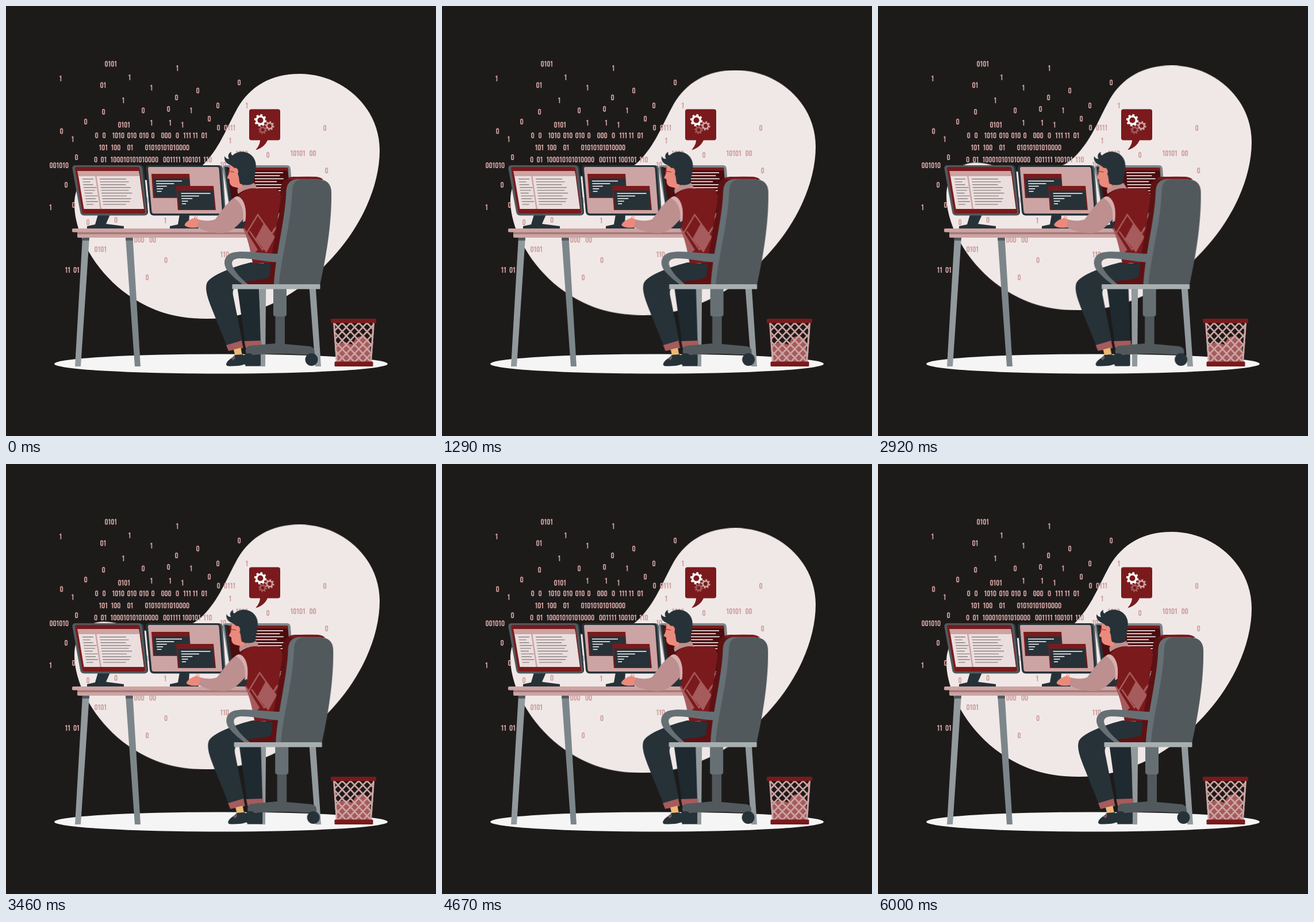
An HTML page that plays this animation: 748x748 px, repeating every 6.04 s.

```html
<!DOCTYPE html>
<html lang="en">
<head>
<meta charset="utf-8">
<title>Programmer at work</title>
<style>
  html, body { margin: 0; width: 100%; height: 100%; overflow: hidden; background: #1d1b1a; }
  svg { display: block; width: 100%; height: 100%; }
  :root { --red: #7a1a1c; --deep: #5e1113; --pink: #cca4a3; --rose: #a65b5c; --ink: #263238; --steel: #667074; --slate: #52595d; --skin: #eb8a7c; }
  .red { fill: var(--red); } .deep { fill: var(--deep); } .pink { fill: var(--pink); }
  .rose { fill: var(--rose); } .ink { fill: var(--ink); } .steel { fill: var(--steel); }
  .slate { fill: var(--slate); } .skin { fill: var(--skin); } .leg { fill: #92999d; }
  .line { fill: none; stroke: #fff; stroke-width: 1.5; }
  .gear circle { fill: none; }

  /* 6 s of motion followed by a 40 ms rest */
  #blob { animation: float 6040ms linear infinite; }
  #worker { animation: shake 6040ms linear infinite; }
  @keyframes float {
    0%, 99.34%, 100% { transform: translateY(0); }
    49.67% { transform: translateY(-15px); }
  }
  @keyframes shake {
    0%, 99.34%, 100% { transform: translateX(0); }
    9.93%, 89.4% { transform: translateX(-1.5px); }
    19.87%, 79.47% { transform: translateX(3px); }
    29.8%, 49.67%, 69.54% { transform: translateX(-6px); }
    39.74%, 59.6% { transform: translateX(6px); }
  }
</style>
</head>
<body>
<svg viewBox="0 0 748 748">
  <defs>
    <clipPath id="basket"><path d="M569 551H641L636 620H574Z"/></clipPath>
    <clipPath id="vestClip"><path d="M404 330C414 319 425 316 438 317L471 318 478 332 460 450 429 447C425 422 420 402 413 388L417 374Z"/></clipPath>
  </defs>

  <path id="blob" fill="#f0e8e7" d="M511 118C585 118 650 176 650 251C650 318 613 393 557 449C505 505 430 544 349 544C290 544 252 528 222 509C160 470 119 400 119 345C119 310 140 287 170 287C200 287 220 303 250 303C290 303 318 300 342 277C372 247 384 211 403 177C425 140 460 118 511 118Z"/>
  <ellipse cx="374" cy="622.5" rx="290" ry="17" fill="#f5f5f5"/>
  <path id="bits" fill="none" stroke="#cda09f" stroke-width="1.7"/>

  <!-- speech bubble -->
  <path class="red" d="M427 179.5H473Q477 179.5 477 183.500V229.500Q477 233.500 473 233.500H455C451 242 444 248 434 250.500C439 245 442 239 442 233.500H427Q423 233.500 423 229.500V183.500Q423 179.500 427 179.500Z"/>
  <g class="gear" stroke="#cca4a3">
    <circle cx="458.500" cy="208.500" r="4.800" stroke-width="2.800"/>
    <circle cx="458.500" cy="208.500" r="7" stroke-width="2.400" pathLength="16" stroke-dasharray="1"/>
  </g>
  <g class="gear" stroke="#a65b5c">
    <circle cx="446.500" cy="215.500" r="4.300" stroke-width="2.600"/>
    <circle cx="446.500" cy="215.500" r="6.200" stroke-width="2.200" pathLength="16" stroke-dasharray="1"/>
  </g>
  <g class="gear" stroke="#fff">
    <circle cx="442.500" cy="198.800" r="6.800" stroke-width="3.500"/>
    <circle cx="442.500" cy="198.800" r="9.200" stroke-width="3" pathLength="16" stroke-dasharray="1"/>
  </g>

  <!-- right monitor -->
  <path fill="#7f878b" d="M384 277H489Q494 277 495 283L501 364H391L377 283Q376 277 384 277Z"/>
  <path class="ink" d="M380 280H386L398 362H391Z"/>
  <path fill="#4b0d0f" d="M384 281H490L497 360H396Z"/>
  <path class="red" d="M388 281H490L491 286H389Z"/>
  <path class="line" id="code3"/>
  <path class="ink" d="M390 387V383L404 380 400 362H420V387Z"/>

  <!-- left monitor -->
  <path class="ink" d="M160 363H181L174 379 205 383V387H141V383L155 380Z"/>
  <path class="ink" d="M228 277H234Q239 277 240 283L247 358Q247 364 241 364H232Z"/>
  <path class="slate" d="M121 277H231Q236 277 237 283L245 358Q246 364.500 240 364.500H136Q130 364.500 129 358L115.500 283Q115 277 121 277Z"/>
  <path class="red" d="M123 280H229Q232 280 232.500 283L242 358Q242 361 239 361H136Q133 361 132.500 358L120 283Q120 280 123 280Z"/>
  <path class="pink" d="M124 287H231L233 297H126Z"/>
  <path fill="#eadfde" d="M126 296H232.500L240 353H135.500Z"/>
  <path class="pink" d="M155 296H157.500L166 353H163.500Z"/>
  <g fill="none" stroke="#8f8484" stroke-width="1.400">
    <path id="code1a"/><path id="code1b"/>
  </g>

  <!-- middle monitor -->
  <path class="ink" d="M302 363H319L318 379 335 383V387H285V383L299 380Z"/>
  <path class="slate" d="M365 277H371Q376 277 377 283L382 358Q382 364 376 364H368Z"/>
  <path class="ink" d="M248 277H368Q373 277 374 283L380 358Q380 364.500 374 364.500H257Q251 364.500 250 358L243 283Q242.500 277 248 277Z"/>
  <path class="pink" d="M249 280H367Q370 280 370.500 283L376 358Q376 361 373 361H257Q254 361 253.500 358L247 283Q247 280 249 280Z"/>
  <path class="red" d="M253 292H319L322 334H256Z"/>
  <path class="ink" d="M256 300H318.500L320.500 332H258.500Z"/>
  <path class="line" id="code2a"/>
  <path class="red" d="M296 313H361L365 355H299Z"/>
  <path class="ink" d="M299 321H360.500L363 353.500H301Z"/>
  <path class="line" id="code2b"/>

  <!-- desk -->
  <path class="leg" d="M133 402H145L130 627H120Z"/>
  <path fill="#7c868a" d="M208 402H220.500L234 627H224Z"/>
  <path class="slate" d="M133 402H145L144.600 408H132.600ZM208 402H220.500L220.900 408H208.400Z"/>
  <path class="leg" d="M440 403H453L451 627H442Z"/>
  <path class="leg" d="M521 403H533L548 627H538Z"/>
  <path class="pink" d="M124 393H540V403H126Q124 403 124 401Z"/>
  <path fill="#a87878" d="M124 393H540V397H124Z"/>
  <rect class="pink" x="115" y="387" width="425" height="6.500" rx="2"/>

  <!-- waste basket -->
  <path class="rose" d="M574 620L575 590 588 584 602 589 609 577 622 573 632 582 636 620Z"/>
  <g clip-path="url(#basket)" fill="none" stroke="#cca4a3">
    <path id="mesh" stroke-width="2.700"/>
    <path d="M569 551L574 620M641 551L636 620" stroke-width="6"/>
  </g>
  <rect class="red" x="565" y="544" width="79" height="7.500" rx="1.500"/>
  <rect class="red" x="571.500" y="618.500" width="67" height="8.500" rx="1.500"/>

  <g id="worker">
    <!-- far leg -->
    <path fill="#1f2a30" d="M402 486H440L443 585 416 586Z"/>
    <path class="ink" d="M424 608C430 606 437 606 443 604V624Q443 626.500 440 626.500H416Z"/>
    <path class="rose" d="M414.500 583L444 582 445 592 417 595Z"/>

    <!-- cushions -->
    <path class="deep" d="M477 484L548 300C543 297 532 297 500 297Q479 299 478 318L476 360 440 474C425 474 403 473 399 484Z"/>
    <path class="red" d="M492 298Q515 296 540 297 548 298 552 302H490Z"/>

    <!-- near leg -->
    <path class="ink" d="M461 449L426 446C400 452 354 468 349 483C346 494 351 508 357 524L384 591 411 583 395 503C394 495 395 492 402 486C416 474 445 480 458 471Z"/>
    <path class="rose" d="M383 590L410 582 412.500 595 387 600Z"/>
    <path fill="#edb875" d="M396 597.500L408.500 594.500 411 608 399 610Z"/>
    <path class="ink" d="M383 623C385 615 394 613 398 607L411 606 419 610V621C411 626 402 626.500 388 626.500Q383 626.500 383 623Z"/>
    <path d="M394 611Q399 607 397 614M392 614Q397 610 395 616" fill="none" stroke="#c98f8e" stroke-width="1"/>

    <!-- torso -->
    <path class="red" d="M404 330C414 319 425 316 438 317L471 318C478 322 479 332 476 350L460 447 429 447C425 422 420 402 413 388L417 374Z"/>
    <g clip-path="url(#vestClip)">
      <path class="rose" d="M449 377L468 402 453 429 434 405ZM414 385L438 424 428 434 412 405ZM478 382L466 410 478 425Z"/>
      <path d="M412 406L438 363 462 397 480 370M424 392L446 424 468 386" fill="none" stroke="#a65b5c" stroke-width="2.500"/>
    </g>
    <path fill="#bd8f8f" d="M407 313L431 307 438 318C426 315 413 320 404 327C401 321 403 316 407 313Z"/>

    <!-- head -->
    <path class="skin" d="M391 274C388 281 389 287 388 291L384.500 299 389 302C388 309 391 314 398 315L409 318 414 306 411 278Z"/>
    <path class="ink" d="M391 277C381 273 379 267 380.500 261C382 265 385 266 388 266C385 261 387 256 392 253.500C391 257 392 259 394 260C400 254 410 251.500 419 255C430 259 436 269 434.500 282C434 294 430 301 431 308C424 313 413 312 407 309C405 304 406 297 403 292C401 284 396 280 391 277Z"/>
    <ellipse class="skin" cx="399" cy="288.500" rx="5" ry="7"/>
    <path d="M386 287L397 289M387 287V293" fill="none" stroke="#7a3a38" stroke-width="1.200"/>

    <!-- arm -->
    <path class="skin" d="M310.500 381C313 374 321 371 328 368.500L340 373 335 385C326 386.500 314 386 310.500 381Z"/>
    <path d="M328 369L330 364M331 370L333 366" stroke="#eb8a7c" stroke-width="1.300"/>
    <path fill="#bd8f8f" d="M399 332C411 331 418 345 417 366C404 381 392 395 375 395C360 395 344 391 332 384.500L336 372C347 374 358 374 364 371C373 360 386 339 399 332Z"/>
    <path fill="#d6afae" d="M401 331C412 331 420 350 416.500 374L412 376C415 356 410 341 396 334Z"/>

    <!-- chair -->
    <path class="steel" d="M466 484C469 430 486 372 487.500 321Q489 301 509 301H545L530 484Z"/>
    <path class="slate" d="M475 484C478 440 496 378 498 320Q499 302 515 301.500H543Q565 302 566 323C567 380 556 440 546.500 484Z"/>
    <path class="steel" d="M480 431C445 431 414 424 394 429C378 434 377 449 385 460C395 472 405 479 411 484H421C409 474 398 463 394 452C391 444 396 439 406 439C430 439 455 446 479 446Z"/>
    <path class="steel" d="M465 492H488V536Q488 540 484 540H469Q465 540 465 536Z"/>
    <path class="slate" d="M468.500 540H485V588L529 592Q537 594 537 602 537 608 531 607L488 605H468L422 607Q416 606 417 598 418 592 424 591L468.500 587Z"/>
    <rect fill="#a8afb1" x="393.500" y="484" width="153" height="8.500" rx="1"/>
    <circle class="ink" cx="422" cy="615" r="11"/>
    <circle class="ink" cx="531.500" cy="615" r="11"/>
  </g>
</svg>

<script>
  const draw = (id, d) => document.getElementById(id).setAttribute('d', d);

  // Condensed digits, drawn around their vertical centre.
  const digit = {
    0: { step: 6, d: 'm.9-2.500a1.700 1.700 0 0 1 3.400 0v5a1.700 1.700 0 0 1-3.400 0z' },
    1: { step: 4.700, d: 'm.2-3.200h1q1.200 0 1.200-1.800v10' }
  };
  const word = (text, x, y) => {
    let d = '';
    for (const c of text) {
      d += `M${x} ${y}${digit[c].d}`;
      x += digit[c].step;
    }
    return d;
  };

  const zeros = [
    [331, 147], [403, 133], [294, 159], [366, 173], [236, 181.5], [280, 179], [167, 184],
    [351, 196], [136, 201], [367, 211.5], [552, 212], [94, 217.5], [120, 263], [453, 259],
    [555, 286], [102, 311], [115, 346], [242, 338], [140, 376], [188.5, 372], [275.5, 442],
    [243, 472], [155, 225], [168, 225], [253, 225], [295.5, 225], [153.5, 267]
  ];
  const ones = [
    [296, 108], [93, 126], [213, 124], [251, 142], [202, 164], [417, 173], [320, 181.5],
    [251, 203], [283.5, 203], [305, 206.5], [114, 231.5], [388, 234], [75.5, 350], [275, 373]
  ];
  const words = `0101 172 100.5/01 164 137.5/0101 195 206.5/0111 379.5 211.5/1010 185 225/010 211 225
    /010 232 225/000 270 225/111 308.5 225/11 325 225/01 340 225/101 162 246/100 183 246/01 211 246
    /01010101010000 242 246/01 165 267/100010101010000 182 267/001111 273.5 267/100101 307 267
    /110 343.5 267/1010 400 256.5/10101 495 256/00 528 256/10 373 276/001010 76 277/000 223 406.5
    /00 249.5 406.5/0101 154 423/11 103 459/01 117.5 459/110 373 432`;

  draw('bits',
    zeros.map(p => word('0', ...p)).join('') +
    ones.map(p => word('1', ...p)).join('') +
    words.split('/').map(s => {
      const [text, x, y] = s.trim().split(' ');
      return word(text, +x, +y);
    }).join(''));

  // Rows of code, each shifted by the slant of its screen.
  const code = (id, x, y, slant, gap, widths) =>
    draw(id, widths.map((w, i) => `M${x + slant * i} ${y + gap * i}h${w}`).join(''));

  code('code1a', 133, 301, .75, 4.9, [19, 13, 17, 22, 19, 14, 22, 18, 21, 12]);
  code('code1b', 163, 301, .65, 4.9, [46, 50, 44, 52, 48, 53, 43, 50, 47, 40]);
  code('code2a', 261, 304.5, .4, 4.5, [45, 31, 18, 11, 8]);
  code('code2b', 304.5, 326, .4, 4.5, [51, 31, 19, 11, 7]);
  code('code3', 432, 290, .4, 5.2, [50, 44, 50, 38, 50, 46, 48, 42, 45]);

  let mesh = '';
  for (let x = 484; x < 650; x += 14.4) mesh += `M${x} 551l68 72M${x + 72} 551l-68 72`;
  draw('mesh', mesh);
</script>
</body>
</html>
```
